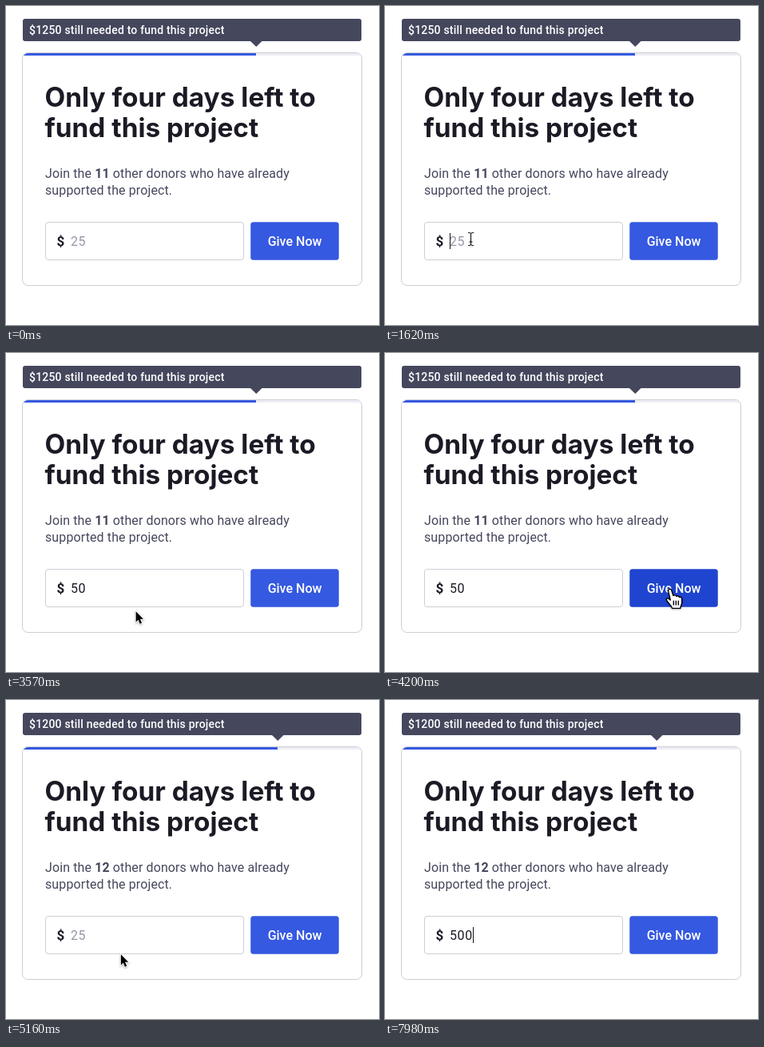
These frames come from a looping animation (467 by 399 pixels, 8 s). An HTML page:

```html
<!DOCTYPE html>
<html lang="en">
<head>
<meta charset="utf-8">
<title>Donation form</title>
<style>
html, body { margin: 0; width: 467px; height: 399px; overflow: hidden; background: #fff; }
svg { display: block; font: 16px Roboto, sans-serif; }
.title { font: 700 33.4px Inter, sans-serif; fill: #1b1a25; }
.body { fill: #45475d; letter-spacing: .11px; }
.note { font-size: 14px; font-weight: 500; fill: #fff; letter-spacing: .19px; }
.field { letter-spacing: .6px; }
.bold { font-weight: 700; }
#cursor { filter: drop-shadow(0 1px 1px rgba(0, 0, 0, .3)); }
</style>
</head>
<body>
<svg width="467" height="399" viewBox="0 0 467 399">
  <clipPath id="clip"><rect x="21" y="59" width="424" height="290" rx="6.5"/></clipPath>
  <rect x="21" y="16" width="424" height="28" rx="3" fill="#45475d"/>
  <path id="pointer" d="M-7.5 43.5H8L.3 51Z" fill="#45475d"/>
  <text class="note" x="29" y="35">$<tspan id="needed"></tspan> still needed to fund this project</text>

  <rect x="20.5" y="58.5" width="425" height="291" rx="7" fill="#fff" stroke="#cdcdd5"/>
  <g clip-path="url(#clip)">
    <rect x="21" y="59" width="424" height="3" fill="#ecedf5"/>
    <rect id="bar" x="21" y="59" height="3" fill="#3559e0"/>
  </g>

  <text class="title" x="48.5" y="126">Only four days left to</text>
  <text class="title" x="48.5" y="164">fund this project</text>
  <text class="body" x="49" y="215">Join the <tspan id="donors" class="bold"></tspan> other donors who have already</text>
  <text class="body" x="49" y="236">supported the project.</text>

  <rect x="49.5" y="270.5" width="248" height="47" rx="3.5" fill="#fff" stroke="#cdcdd5"/>
  <text class="bold" x="63.5" y="300" font-size="17" fill="#1b1a25">$</text>
  <text id="amount" class="field" x="81" y="300"></text>
  <rect id="caret" y="284" width="1" height="20" fill="#111"/>
  <rect id="button" x="306.25" y="270.25" width="110.5" height="47.5" rx="3.5"/>
  <text x="361.5" y="300" text-anchor="middle" font-weight="500" fill="#fff">Give Now</text>

  <g id="cursor">
    <path id="arrow" d="M0 0V13.3L3 10.5L5 15.4L7.4 14.4L5.3 9.5H9.4Z" fill="#000" stroke="#fff" stroke-width="1.8" paint-order="stroke"/>
    <g id="beam" fill="none" stroke="#111">
      <path id="stem" d="M-3.5 -8H-2Q0 -8 0 -6.3V6.3Q0 8 -2 8H-3.5M3.5 -8H2Q0 -8 0 -6.3M3.5 8H2Q0 8 0 6.3M-2 3.5H2"/>
    </g>
    <g id="hand" transform="translate(-2) scale(1.06)" stroke="#000" stroke-width="1.3" stroke-linejoin="round" stroke-linecap="round">
      <path d="M-4.2 .9C-3.6 -1.2 -.9 -1.2 -.2 .9L1.8 7.2C3 6 5 6.2 5.5 7.9C6.8 6.8 8.4 7.3 9 9C10.5 8.3 12 9.2 12 11V15C12 17.5 10.5 18.5 10.3 22H.5C.2 19.5 -2.6 17.6 -4.4 14.8C-5.4 13.2 -7 12 -6.2 10.8C-5 9.4 -3 10.8 -1.6 12.4C-2.4 8.5 -3.4 4.5 -4.2 .9Z" fill="#fff"/>
      <path d="M2.2 13.5V18M5 13.5V18M7.8 13.5V18" fill="none"/>
    </g>
  </g>
</svg>
<script>
const LOOP = 8000, PAID = 4440, BLINK = 450;
const $ = id => document.getElementById(id);
const clamp = v => Math.max(0, Math.min(1, v));
const smooth = k => k * k * (3 - 2 * k);
const progress = (t, from, to) => clamp((t - from) / (to - from));
const show = (id, on) => $(id).style.display = on ? '' : 'none';
const mix = (a, b, k) => `rgb(${a.map((v, i) => Math.round(v + (b[i] - v) * k))})`;
const latest = (list, t) => list.filter(e => e.at <= t).pop() || list[0];

// Each move eases along one cubic curve
const field = [107.5, 291.5], button = [361, 296];
const moves = [
  { at: 30, end: 570, curve: [[129, 396], [122, 350], [110, 305], field] },
  { at: 3390, end: 4020, curve: [field, [185, 367], [350, 320], button] },
  { at: PAID, end: 5370, curve: [button, [354, 319], [157, 353], [123.5, 303]] }
];

// Each event restarts the caret's blink
const events = [
  { at: 0, value: '' },
  { at: 720, value: '', focus: true },
  { at: 2130, value: '5', focus: true },
  { at: 2190, value: '50', focus: true },
  { at: 4200, value: '50' },
  { at: PAID, value: '' },
  { at: 5790, value: '', focus: true },
  { at: 6750, value: '5', focus: true },
  { at: 6930, value: '50', focus: true },
  { at: 7080, value: '500', focus: true }
];

function mouseAt(t) {
  const { at, end, curve: [a, b, c, d] } = latest(moves, t);
  const k = smooth(progress(t, at, end)), n = 1 - k;
  return [0, 1].map(i =>
    n * n * n * a[i] + 3 * n * n * k * b[i] + 3 * n * k * k * c[i] + k * k * k * d[i]);
}

function drawForm(t, { at, value, focus }) {
  const paid = t >= PAID;
  $('needed').textContent = paid ? 1200 : 1250;
  $('donors').textContent = paid ? 12 : 11;

  const end = 313 + 27 * smooth(progress(t, PAID, 4650));
  $('bar').setAttribute('width', end - 21);
  $('pointer').setAttribute('transform', `translate(${end})`);

  $('amount').textContent = value || '25';
  $('amount').setAttribute('fill', value ? '#1b1a25' : '#9697a8');
  $('caret').setAttribute('x', Math.round(81 + 9.6 * value.length));
  show('caret', focus && Math.floor((t - at) / BLINK) % 2 === 0);

  const hover = progress(t, 3790, 3970) - progress(t, 4640, 4840);
  $('button').setAttribute('fill', mix([53, 89, 224], [31, 68, 207], hover));
}

function drawMouse(t, event) {
  const [x, y] = mouseAt(t);
  const inRow = y > 270 && y < 318;
  const beam = inRow && x > 49 && x < 298;
  const hand = inRow && x > 306 && t < 4650;
  const hiddenByTyping = event.value && t < moves[1].at || t >= 6750;
  $('cursor').setAttribute('transform', `translate(${x} ${y})`);
  show('cursor', t >= moves[0].at && !hiddenByTyping);
  show('beam', beam);
  show('hand', hand);
  show('arrow', !beam && !hand);
}

function draw(t) {
  const event = latest(events, t);
  drawForm(t, event);
  drawMouse(t, event);
}

const start = performance.now();
function tick() {
  draw((performance.now() - start) % LOOP);
  requestAnimationFrame(tick);
}
draw(0);
tick();
</script>
</body>
</html>
```
